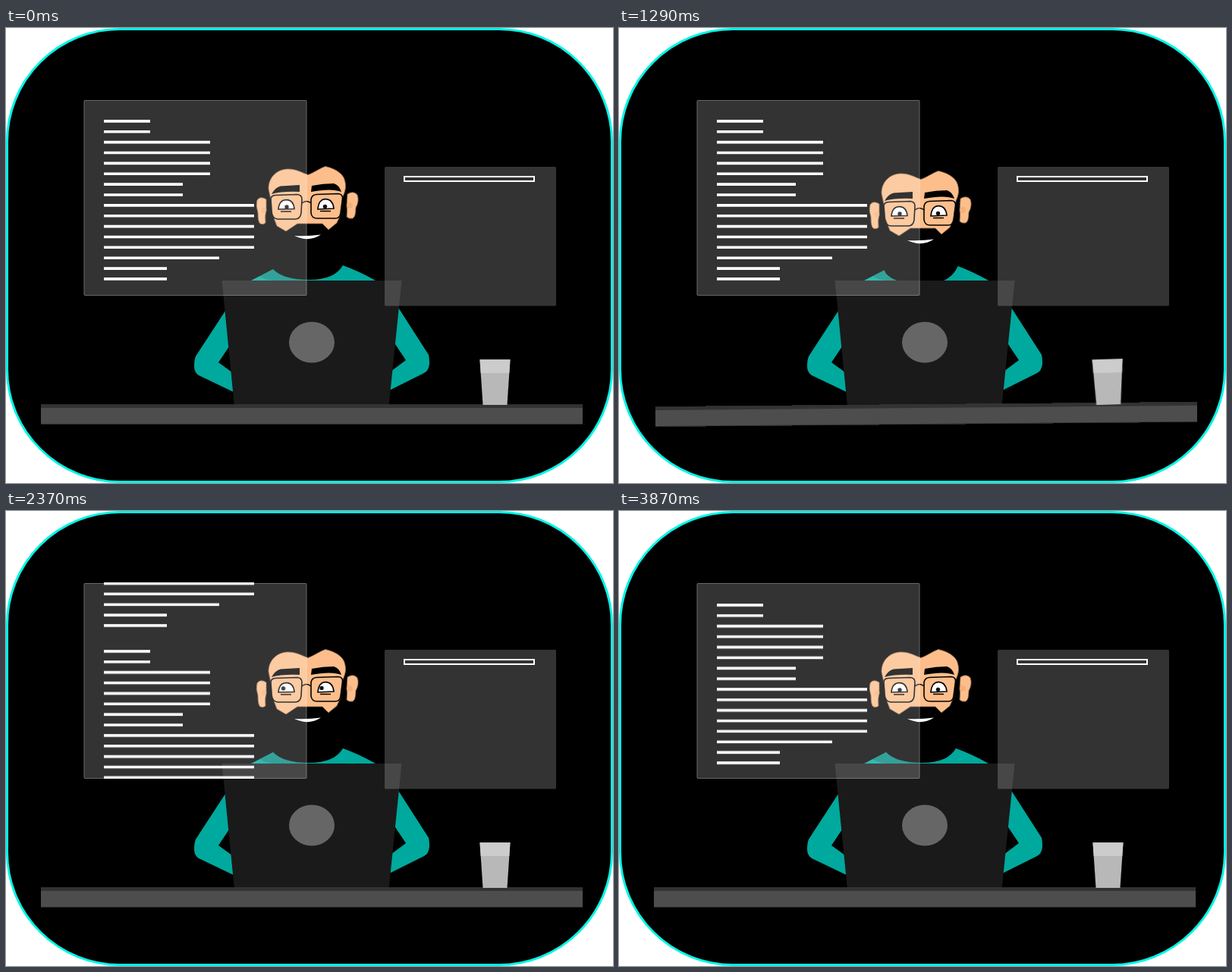
Animation of 800x600 px, one loop 4.14 s. Source, as an HTML page without scripts:

```html
<!DOCTYPE html>
<html lang="en">
<head>
<meta charset="utf-8">
<title>Developer at a desk</title>
<style>
  html, body { margin: 0; width: 100%; height: 100%; overflow: hidden; background: #fff; }
  svg { display: block; width: 800px; height: 600px; }

  .teal { fill: #00a99d; }
  .skin { fill: #fdbe8b; stroke: #8a6648; stroke-width: .8; }
  .pane { fill: #fff; fill-opacity: .2; }
  .wire { fill: none; stroke: #fff; stroke-width: 2; }
  .ink { fill: none; stroke: #000; stroke-width: 1.6; }
  .eye { fill: #fff; stroke: #000; stroke-width: 1.6; }

  .head, .face, .pupils, .desk, .glass, .code, .grow {
    animation: 4140ms ease-in-out infinite;
  }
  .head { animation-name: nod; }
  .face { animation-name: tilt; }
  .pupils { animation-name: look; }
  .desk { animation-name: rock; transform-origin: 400px 300px; }
  .glass { animation-name: wobble; transform-origin: 644px 470px; }
  .code { animation-name: scroll; }
  .grow { animation-name: widen; }
  .hero { transform-origin: 525px 230px; }
  .card { transform-origin: 621px 287px; }

  @keyframes nod {
    0%, 2.2%, 44.9%, 100% { transform: none; }
    11.6%, 39.1% { transform: translateY(6px); }
  }
  @keyframes tilt {
    0%, 2.2%, 49%, 100% { transform: none; }
    11.6%, 39.1% { transform: translateY(3px); }
  }
  @keyframes look {
    0%, 40%, 93.5%, 100% { transform: none; }
    43.5% { transform: translate(-1.5px, 0); }
    52%, 58% { transform: translate(-4.5px, -2px); }
    68.8% { transform: translate(1.2px, -1.6px); }
    76%, 88% { transform: translate(4px, 0); }
  }
  @keyframes rock {
    0%, 51.4%, 100% { transform: rotate(0); }
    9.4% { transform: rotate(.5deg); }
    17.6% { transform: rotate(-.27deg); }
    22.5% { transform: rotate(1.03deg); }
    30.4% { transform: rotate(-.53deg); }
    36.2% { transform: rotate(.3deg); }
    43.5% { transform: rotate(-1.05deg); }
  }
  @keyframes wobble {
    0%, 51.4%, 100% { transform: translateY(0) rotate(0); }
    9.4% { transform: translateY(1px) rotate(1.2deg); }
    17.6% { transform: translateY(-.3px) rotate(-.7deg); }
    22.5% { transform: translateY(1px) rotate(2.5deg); }
    30.4% { transform: translateY(-.4px) rotate(-1.6deg); }
    36.2% { transform: translateY(.3px) rotate(.8deg); }
    43.5% { transform: translateY(-1px) rotate(-2.5deg); }
  }
  @keyframes scroll {
    0%, 41.5% { transform: none; }
    65.7%, 100% { transform: translateY(-240.8px); }
  }
  @keyframes widen {
    0%, 65.94% { transform: scaleX(0); }
    89.1%, 92.74% { transform: scaleX(1); }
    92.75%, 100% { transform: scaleX(0); }
  }
</style>
</head>
<body>
<svg viewBox="0 0 800 600">
  <defs>
    <clipPath id="pane"><rect x="103" y="94" width="294" height="259"/></clipPath>
    <path id="lines" fill="none" stroke="#fff" stroke-width="3.6" d="M129 122.9H190M129 136.8H190
      M129 150.6H269M129 164.5H269M129 178.4H269M129 192.2H269M129 206.1H233M129 220H233
      M129 233.9H327M129 247.7H327M129 261.6H327M129 275.5H327M129 289.3H327
      M129 303.2H281M129 317.1H212M129 330.9H212"/>
  </defs>

  <rect x="1.5" y="1.5" width="797" height="597" rx="148.5" stroke="#00f5e6" stroke-width="3"/>

  <!-- body -->
  <g class="teal">
    <path d="M323 333L352 318L444 313Q466 321 487 333Z"/>
    <path d="M291 370L250 433Q248 438 248 446Q248 454 254 458L302 481V457L280 441L298 414Z"/>
    <path d="M514 364L557 431Q558 435 558 443Q557 452 551 455L503 479V456L527 438L511 414Z"/>
  </g>
  <path d="M334 327L352 318L400 333H352Q341 332 334 327Z" fill-opacity=".18"/>

  <!-- head -->
  <g class="head">
    <path d="M340 296L352 318Q365 332 400 332Q433 332 444 313L452 298V225H342Z"/>
    <g class="skin">
      <path d="M346 212C346 196 358 186 372 186C383 186 390 191 398 193.5C406 191 413 185 421 182.5
        C432 185 441 190 445 197C449 206 448 214 444 222L441 246L436 257L425 266L417 258H384
        L369 268L357 261L351 245L349 226Z"/>
      <path d="M343 226Q335 221 331 227Q329 234 332 243Q332 256 335 258Q339 260 342 257Q341 247 343 240Z"/>
      <path d="M450 219Q458 214 463 220Q466 228 461 237Q461 249 457 251Q452 252 449 249Q450 239 449 234Z"/>
    </g>
    <circle cx="453" cy="234" r="4" fill="#efa873" fill-opacity=".6"/>
    <circle cx="340" cy="240" r="3.5" fill="#efa873" fill-opacity=".5"/>
    <path fill="#fff" d="M380 274Q398 275 415 272.5Q399 283 380 274Z"/>

    <g class="face">
      <path d="M350 219Q355 210 362 208.5L387 207V216Q364 215 350 219Z"/>
      <path d="M402 216L403 208Q418 205 432 205Q439 207 442 216Q429 211 402 216Z"/>
      <path class="eye" d="M359 239Q360 226.5 370 226.5Q379 227 380 238.5Z"/>
      <path class="eye" d="M411 239Q412 226 421 225.5Q431 226 432 238Z"/>
      <g class="pupils" fill="#111">
        <circle cx="370" cy="236" r="2.7"/>
        <circle cx="420.5" cy="235.5" r="2.7"/>
      </g>
      <path class="ink" d="M362 242H376M414 241.5H428"/>
      <path class="ink" d="M349 226Q349 221 355 220.5L384 219.5Q390 220 390 226L389 244Q388 252 381 252
        L358 252Q351 251 350 243Z"/>
      <path class="ink" d="M402 226Q403 220 409 219.5L438 218.5Q444 219 443.5 225L441 244Q440 251 434 251
        H410Q403 251 402 244ZM390 231Q396 226 402 231"/>
    </g>
  </g>

  <!-- laptop -->
  <path fill="#1a1a1a" d="M284.5 333H521.5L504.5 499H301Z"/>
  <ellipse cx="403" cy="414.5" rx="30" ry="27" fill="#666"/>

  <!-- desk -->
  <g class="desk">
    <rect x="46" y="496.5" width="714" height="26" fill="#4d4d4d"/>
    <rect x="46" y="496.5" width="714" height="4.5" fill="#333"/>
  </g>
  <g class="glass">
    <path fill="#b8b8b8" d="M624.5 437.3H664.5L660.5 497H628.5Z"/>
    <path fill="#ccc" d="M624.5 437.3H664.5L663.3 455H625.7Z"/>
  </g>

  <!-- code window -->
  <rect class="pane" x="102.5" y="95" width="294" height="258" rx="1.5"/>
  <rect x="103" y="95.5" width="293" height="257" rx="1.5" fill="none" stroke="#fff" stroke-opacity=".25"/>
  <g clip-path="url(#pane)">
    <g class="code">
      <use href="#lines"/>
      <use href="#lines" y="242"/>
    </g>
  </g>

  <!-- layout window -->
  <rect class="pane" x="499" y="183" width="226" height="183.5" rx="1.5"/>
  <g class="wire">
    <rect x="525" y="196" width="171" height="6"/>
    <rect class="grow hero" x="525" y="209" width="171" height="42.5"/>
    <rect class="grow card" x="622" y="264.5" width="74" height="45.5"/>
  </g>
</svg>
</body>
</html>
```
